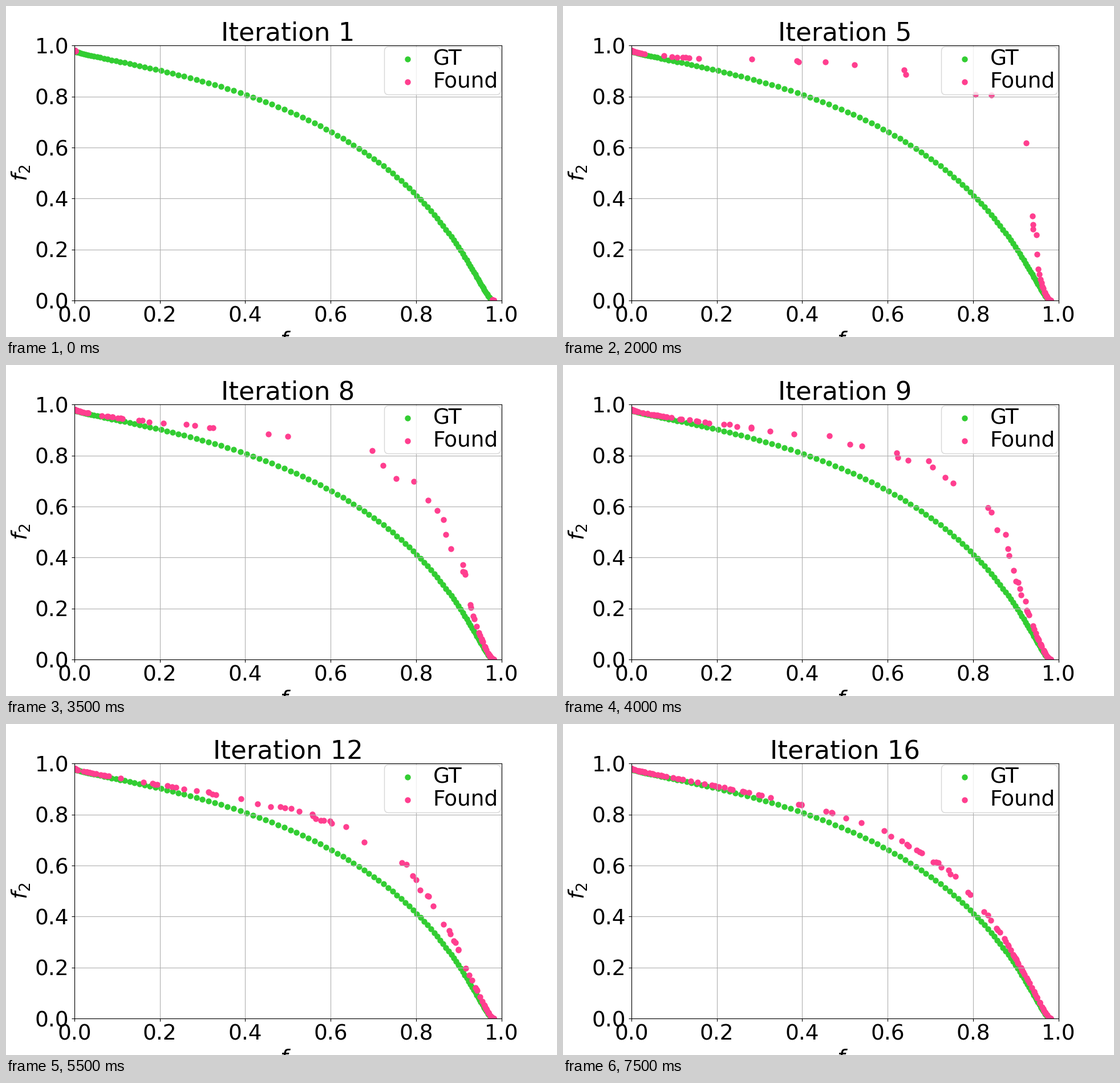
Recreate the animation shown at these times as a matplotlib script. Size 966 by 580 pixels, loop 8 s.

```python
import numpy as np
import matplotlib.pyplot as plt
from matplotlib.animation import FuncAnimation

GENERATIONS = 16
GREEN, PINK = "limegreen", "#ff3e8f"


def pareto(t):
    """Exact front of the Fonseca-Fleming problem, t in [-1, 1]."""
    return np.column_stack([1 - np.exp(-(t - 1) ** 2),
                            1 - np.exp(-(t + 1) ** 2)])


def nondominated(pts):
    a, b = pts[:, None], pts[None]
    beaten = ((b <= a).all(2) & (b < a).any(2)).any(1)
    return pts[~beaten]


def found(gen, size=160):
    """Front of one generation: crowded ends and a bulge that decays."""
    rng = np.random.default_rng(gen)
    reach = 1 if gen > 1 else .05
    crowding = 3.6 - .12 * gen
    t = 1 - reach * rng.random(size) ** crowding
    t[:2] = 1
    t[::2] *= -1

    room = 1 - t ** 2
    height = .18 * np.exp(-.17 * (gen - 5))
    bulge = height * room ** (3 + .3 * gen)
    gap = bulge * rng.uniform(.85, 1.2, size) + .006 * room
    return nondominated(pareto(t) + gap[:, None])


plt.rcParams.update({"font.family": "DejaVu Sans", "font.size": 27})
fig, ax = plt.subplots(figsize=(9.66, 5.8), dpi=100)
fig.subplots_adjust(left=.1241, right=.8992, bottom=.1102, top=.8802)

truth = pareto(np.arange(-1, 1, .01 * np.sqrt(3)))
ax.scatter(*truth.T, s=42, color=GREEN, label="GT")
dots = ax.scatter([], [], s=42, color=PINK, label="Found")

ticks = np.linspace(0, 1, 6)
ax.set(xlim=(0, 1), ylim=(0, 1), xticks=ticks, yticks=ticks)
ax.set_xlabel("$f_1$")
ax.set_ylabel("$f_2$", labelpad=3)
ax.grid()
ax.legend(loc="upper right", borderpad=.1, borderaxespad=.05,
          labelspacing=.1, handletextpad=.2)
title = ax.set_title("Iteration 1")


def update(i):
    title.set_text(f"Iteration {i + 1}")
    dots.set_offsets(found(i + 1))
    return dots, title


anim = FuncAnimation(fig, update, frames=GENERATIONS, interval=500,
                     repeat=True, repeat_delay=0)
plt.show()
```
